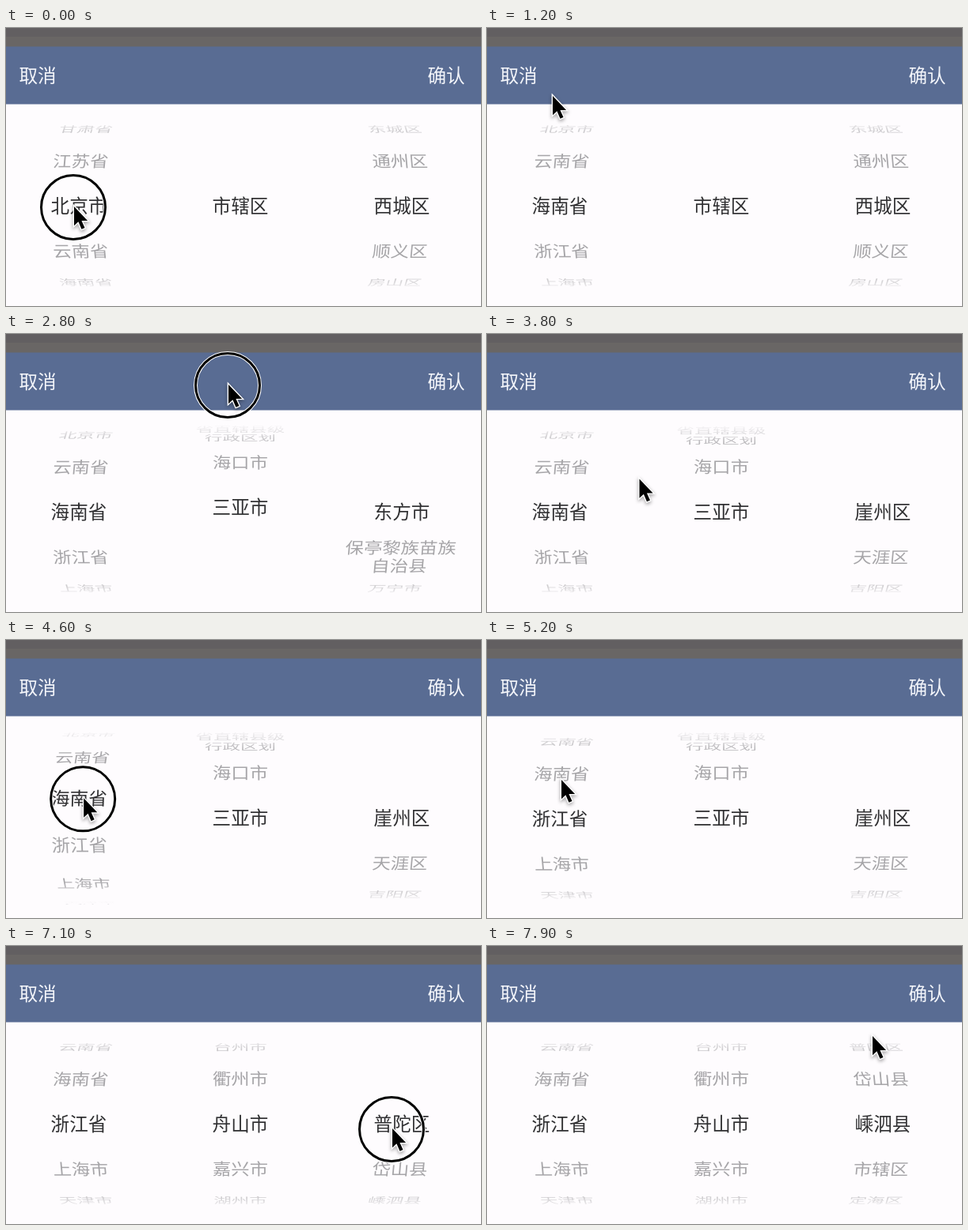
Animation of 600 by 352 pixels, one loop 8000 ms. Source, as an HTML page with a canvas:

```html
<!DOCTYPE html>
<html lang="zh-CN">
<head>
<meta charset="utf-8">
<title>地区选择</title>
<style>
html, body { margin: 0; width: 100%; height: 100%; overflow: hidden; }
canvas { display: block; width: 600px; height: 352px; }
</style>
</head>
<body>
<canvas id="stage" width="600" height="352"></canvas>
<script>
const ctx = document.getElementById('stage').getContext('2d');
const LOOP = 8000, STEP = 100;
const FONT = '23.6px "Noto Sans CJK SC", "Noto Sans CJK", sans-serif';
const AXIS_X = 296, AXIS_Y = 225.5, RADIUS = 108.5, ITEM_ANGLE = 0.553, DEPTH = 0.08;
const TRAVEL = 500, HOLD = 150, SETTLE = 300, DRAG_PER_ITEM = 80;

// Lists replace each other at their start time; first is the item selected then
const columns = [
  [{ since: 0, first: 2, items: '甘肃省 江苏省 北京市 云南省 海南省 浙江省 上海市 天津市' }],
  [
    { since: 0, first: 0, items: '市辖区' },
    { since: 1300, first: 0, items: '省直辖县级|行政区划 海口市 三亚市' },
    { since: 5300, first: 0, items: '台州市 衢州市 舟山市 嘉兴市 湖州市' }
  ],
  [
    { since: 0, first: 2, items: '东城区 通州区 西城区 顺义区 房山区' },
    { since: 1300, first: 0, items: '东方市 保亭黎族苗族|自治县 万宁市' },
    { since: 3300, first: 0, items: '崖州区 天涯区 吉阳区' },
    { since: 5300, first: 0, items: '玉环县 三门县 温岭市' },
    { since: 6800, first: 0, items: '普陀区 岱山县 嵊泗县 市辖区 定海区' }
  ]
];

// The pointer sets out at go, then drags a column between start and end
const drags = [
  { column: 0, go: -TRAVEL, start: 0, end: 700, from: [85, 227], to: [82, 87] },
  { column: 1, go: 1300, start: 2250, end: 2750, from: [293, 233], to: [280, 65] },
  { column: 0, go: 3550, start: 4350, end: 4800, from: [103, 234], to: [93, 178] },
  { column: 1, go: 5300, start: 5850, end: 6350, from: [293, 222], to: [293, 118] },
  { column: 2, go: 6400, start: 7200, end: 7400, from: [487, 232], to: [486, 115] }
];

const lerp = (a, b, p) => a + (b - a) * p;

function ease(t, from, to) {
  const p = Math.min(1, Math.max(0, (t - from) / (to - from)));
  return p * p * (3 - 2 * p);
}

// Items scrolled: follows the finger, then snaps to a whole item
function scrolled(d, t) {
  const reach = (d.from[1] - d.to[1]) / DRAG_PER_ITEM;
  const up = d.end + HOLD;
  return lerp(reach * ease(t, d.start, d.end), Math.round(reach + 0.3), ease(t, up, up + SETTLE));
}

function pointerAt(t) {
  const i = drags.findLastIndex(d => d.go <= t);
  const d = drags[i], before = drags[i - 1] || d;
  const travel = ease(t, d.go, d.go + TRAVEL), drag = ease(t, d.start, d.end);
  const x = lerp(lerp(before.to[0], d.from[0], travel), d.to[0], drag);
  const y = lerp(lerp(before.to[1], d.from[1], Math.sqrt(travel)), d.to[1], drag);
  return { x, y, pressed: t >= d.start - HOLD && t < d.end + HOLD };
}

function label(text, x, y) {
  const lines = text.split('|');
  lines.forEach((line, i) =>
    ctx.fillText(line, x, y + 8.3 + (i - (lines.length - 1) / 2) * 28));
}

function drawColumn(lists, column, t) {
  const list = lists.findLast(l => l.since <= t);
  const pos = drags
    .filter(d => d.column === column && d.start >= list.since)
    .reduce((sum, d) => sum + (t > d.start ? scrolled(d, t) : 0), list.first);
  const offset = (column - 1) * 204;
  list.items.split(' ').forEach((text, i) => {
    const angle = (i - pos) * ITEM_ANGLE;
    if (Math.abs(angle) > 1.5) return;
    const sin = Math.sin(angle), cos = Math.cos(angle);
    const scale = 1 - DEPTH * (1 - cos);
    ctx.save();
    ctx.transform(scale, 0, -offset * DEPTH * sin / RADIUS, cos,
      AXIS_X + offset * scale, AXIS_Y + RADIUS * sin);
    ctx.fillStyle = Math.abs(i - pos) < 0.5 ? '#303032' : '#a6a5a8';
    label(text, 0, 0);
    ctx.restore();
  });
}

function fade(clearY, solidY) {
  const g = ctx.createLinearGradient(0, clearY, 0, solidY);
  g.addColorStop(0, 'rgba(254,252,254,0)');
  g.addColorStop(1, 'rgb(254,252,254)');
  rect(g, Math.min(clearY, solidY), Math.abs(solidY - clearY));
}

function rect(fill, y, height) {
  ctx.fillStyle = fill;
  ctx.fillRect(0, y, 600, height);
}

function ring(x, y) {
  ctx.beginPath();
  ctx.arc(x, y, 40.5, 0, 7);
  for (const [color, width] of [['#fff', 5], ['#000', 3]]) {
    ctx.strokeStyle = color;
    ctx.lineWidth = width;
    ctx.stroke();
  }
}

const arrow = new Path2D('M0 0V27L6 21.5L10.5 32L15 30L10.5 20H19Z');
function drawPointer(t) {
  const { x, y, pressed } = pointerAt(t);
  if (pressed) ring(x, y);
  ctx.save();
  ctx.translate(x + 1, y - 1);
  ctx.scale(0.9, 0.9);
  ctx.strokeStyle = '#fff';
  ctx.lineWidth = 3;
  ctx.shadowColor = 'rgba(0,0,0,.4)';
  ctx.shadowBlur = 4;
  ctx.shadowOffsetY = 2;
  ctx.stroke(arrow);
  ctx.shadowColor = 'transparent';
  ctx.fillStyle = '#000';
  ctx.fill(arrow);
  ctx.restore();
}

function draw(t) {
  ctx.font = FONT;
  ctx.textAlign = 'center';
  rect('#fefcfe', 0, 352);
  columns.forEach((lists, i) => drawColumn(lists, i, t));
  fade(145, 114);
  fade(305, 334);
  rect('#625f61', 0, 11);
  rect('#696665', 11, 13);
  rect('#596c93', 23.5, 73);
  ctx.fillStyle = '#f3f5fa';
  label('取消', 40, 60.2);
  label('确认', 556, 60.2);
  drawPointer(t);
}

let begin;
function tick(now) {
  begin ??= now;
  draw(Math.floor((now - begin) % LOOP / STEP) * STEP);
  requestAnimationFrame(tick);
}
requestAnimationFrame(tick);
</script>
</body>
</html>
```
